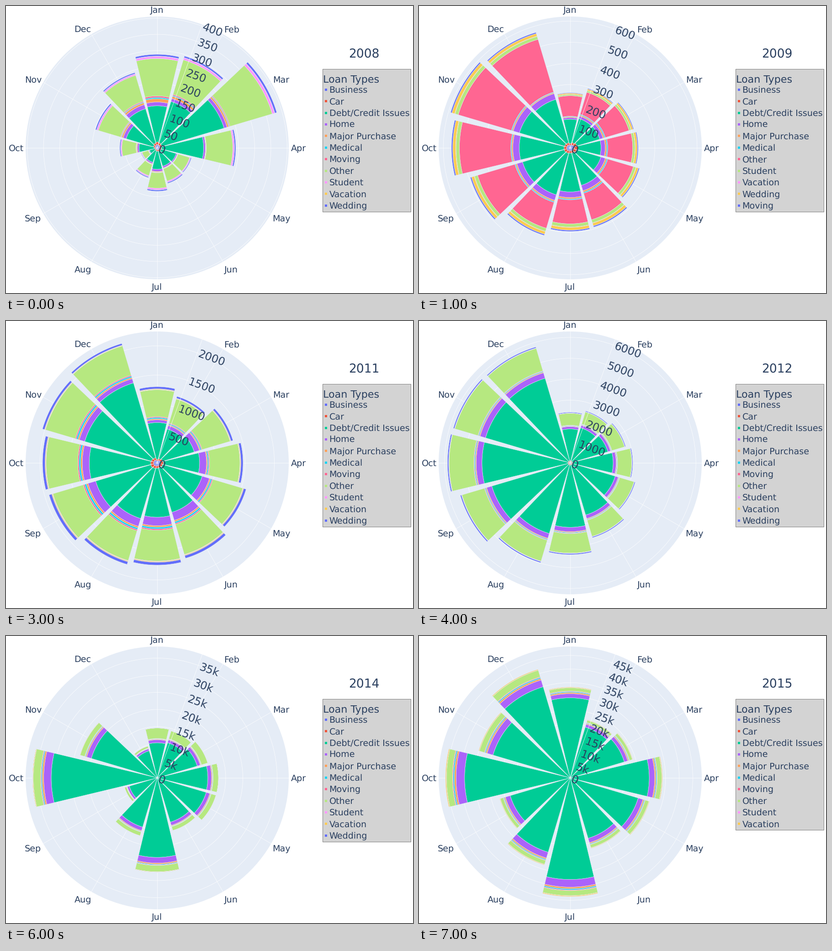
Write a matplotlib script that moves like this. It is 891x629 px and loops after 8 s.

```python
import numpy as np
import matplotlib.pyplot as plt
from matplotlib.animation import FuncAnimation
from matplotlib.collections import PolyCollection
from matplotlib.patches import Circle, Rectangle

W, H, DPI = 891, 629, 64
PT = 72 / DPI  # points per pixel
CX, CY, R = 331, 311, 288
TILT = 20  # direction of the radial axis
INK, PAPER = "#2a3f5f", "#e5ecf6"
COLORS = ["#636efa", "#ef553b", "#00cc96", "#ab63fa", "#ffa15a", "#19d3f3",
          "#ff6692", "#b6e880", "#ff97ff", "#fecb52", "#636efa"]
MONTHS = "Jan Feb Mar Apr May Jun Jul Aug Sep Oct Nov Dec".split()
LABEL_X = [0, 163, 271, 309, 272, 162]
LABEL_Y = [15, 58, 168.5, 318, 472.5, 584, 622.5]
HEAD = ["Business", "Car", "Debt/Credit Issues", "Home", "Major Purchase", "Medical"]
TYPES = HEAD + ["Moving", "Other", "Student", "Vacation", "Wedding"]
TYPES_2009 = HEAD + ["Other", "Student", "Vacation", "Wedding", "Moving"]

plt.rcParams.update({"font.family": "DejaVu Sans", "text.hinting": "no_hinting"})


def curve(*keys):
    """Monthly values through key points spread evenly from Jan to Dec."""
    return np.interp(np.arange(12), np.linspace(0, 11, len(keys)), keys)


def split(lo, hi, mix):
    """Outer edges of the layers that share the ring lo..hi."""
    return [lo + (hi - lo) * f for f in np.cumsum(mix) / sum(mix)]


def rings(total, car, debt, home, small, tail, small_mix, tail_mix):
    """Edge radii of all layers by month, from the share of each group."""
    total = np.array(total)
    debt_end = total * debt
    home_end = debt_end + total * home
    small_end = home_end + total * small
    other_end = total * (1 - tail)
    return [0 * total, 0.55 * car, car, debt_end, home_end,
            *split(home_end, small_end, small_mix),
            other_end, *split(other_end, total, tail_mix)]


# year: (axis maximum, tick step, layer names, edges)
YEARS = {
    2008: (405, 50, TYPES, rings(
        [205, 210, 273, 172, 78, 81, 95, 68, 37, 82, 141, 172],
        car=curve(13, 10, 8, 5, 11), debt=curve(.45, .6, .5, .47, .52),
        home=curve(.04, .02, .05, .04, .055), small=curve(.065, .01, .03, .035, .045),
        tail=curve(.045, .035, .07, .065, .035),
        small_mix=[.55, .2, .25], tail_mix=[.52, .06, .42])),
    2009: (622, 100, TYPES_2009, rings(
        [121, 136, 145, 149, 158, 181, 183, 200, 228, 260, 273, 264],
        car=curve(10, 17, 11, 14, 12), debt=curve(.52, .46, .44, .56, .43, .42),
        home=curve(.03, .06, .07, .055, .05), small=curve(.025, .04, .03, .02, .013),
        tail=curve(.055, .08, .095, .07, .06),
        small_mix=[.6, .4], tail_mix=[.43, .03, .38, .16])),
    2010: (1310, 200, TYPES, rings(
        [128, 138, 168, 192, 205, 230, 252, 248, 247, 252, 254, 273],
        car=curve(7, 7, 11, 12), debt=curve(.41, .45, .41, .44, .47, .465),
        home=curve(.045, .053, .058), small=curve(.03, .025, .045, .04, .042),
        tail=curve(.045, .058, .05, .043, .043),
        small_mix=[.35, .3, .35], tail_mix=[.2, .14, .66])),
    2011: (2245, 500, TYPES, rings(
        [167, 152, 173, 188, 203, 218, 224, 232, 247, 251, 262, 273],
        car=curve(8, 14, 11, 15, 12), debt=curve(.53, .485, .51, .54, .585, .67),
        home=curve(.035, .08, .085, .07, .035), small=curve(.042, .034, .045, .043, .03),
        tail=curve(.04, .036, .04, .035, .02),
        small_mix=[.35, .38, .27], tail_mix=[.1, .2, .7])),
    2012: (6281, 1000, TYPES, rings(
        curve(111, 128, 153, 219, 269, 265),
        car=curve(5), debt=curve(.67, .73), home=.047, small=curve(.027, .017),
        tail=curve(.02, .012),
        small_mix=[.4, .35, .25], tail_mix=[.1, .2, .7])),
    2013: (14670, 2000, TYPES, rings(
        [127, 140, 153, 174, 188, 199, 218, 232, 239, 259, 270, 273],
        car=curve(2.5), debt=curve(.735, .685, .675, .69, .72),
        home=curve(.04, .055, .053, .047, .042), small=.018,
        tail=curve(.012, .013, .008),
        small_mix=[.45, .35, .2], tail_mix=[.1, .25, .65])),
    2014: (38400, 5000, TYPES, rings(
        [110, 108, 116, 135, 135, 121, 207, 133, 75, 273, 177, 73],
        car=curve(2), debt=curve(.7, .82, .84, .85, .85), home=.06, small=.025,
        tail=.006,
        small_mix=[.5, .3, .2], tail_mix=[.05, .9, .05])),
    2015: (48300, 5000, TYPES[:-1], rings(
        [199, 133, 143, 202, 181, 161, 260, 199, 161, 273, 209, 248],
        car=curve(2), debt=curve(.882, .857, .858, .85, .84),
        home=curve(.045, .058, .063, .07, .062), small=.029, tail=.0075,
        small_mix=[.48, .32, .2], tail_mix=[.1, .9])),
}

fig = plt.figure(figsize=(W / DPI, H / DPI), dpi=DPI, facecolor="white")
ax = fig.add_axes([0, 0, 1, 1])


def polar(r, deg):
    """Screen point at radius r, clockwise from the top."""
    a = np.radians(deg)
    return CX + r * np.sin(a), CY - r * np.cos(a)


def text(x, y, s, px, **kw):
    kw = {"ha": "left", "va": "baseline", "color": INK, **kw}
    ax.text(x, y, s, fontsize=px * PT, **kw)


def spoke(deg, zorder):
    ax.plot(*zip((CX, CY), polar(R, deg)), color="white", lw=0.7 * PT, zorder=zorder)


def sector(r0, r1, mid_deg):
    arc = mid_deg + np.linspace(-13.5, 13.5, 28)
    outer = np.column_stack(polar(r1, arc))
    inner = np.column_stack(polar(r0, arc[::-1]))
    return np.vstack([outer, inner])


def draw_grid(top, step):
    ax.add_patch(Circle((CX, CY), R, fc=PAPER, ec="none"))
    for v in range(step, top, step):
        ax.add_patch(Circle((CX, CY), v / top * R, fc="none", ec="white",
                            lw=0.7 * PT, zorder=1.5))
    for m, name in enumerate(MONTHS):
        spoke(30 * m, 1.5)
        side = 1 if m < 6 else -1
        x = LABEL_X[min(m, 12 - m)] if m != 6 else 0
        text(CX + side * x, LABEL_Y[min(m, 12 - m)], name, 19.1, ha="center")


def draw_bars(edges):
    for lo, hi, color in zip(edges, edges[1:], COLORS):
        polys = [sector(lo[m], hi[m], 30 * m) for m in range(12)]
        ax.add_collection(PolyCollection(polys, facecolors=color, edgecolors=PAPER,
                                         linewidths=0.6 * PT, zorder=2))


def draw_axis(top, step):
    c, s = np.cos(np.radians(TILT)), np.sin(np.radians(TILT))
    spoke(TILT, 3)
    for v in range(0, top, step):
        x, y = polar(v / top * R, TILT)
        label = f"{v // 1000}k" if top > 10000 and v else str(v)
        text(x + 3.2 * c - 8.7 * s, y + 3.2 * s + 8.7 * c, label, 24,
             rotation=-TILT, rotation_mode="anchor", zorder=4)


def draw_legend(names):
    ax.add_patch(Rectangle((693, 138.3), 193.2, 33 + 25.4 * len(names),
                           fc="#d3d3d3", ec="#808080", lw=PT))
    text(694, 167.5, "Loan Types", 22.2)
    for i, name in enumerate(names):
        y = 183.3 + 25.4 * i
        ax.add_patch(Rectangle((698, y - 2.5), 5, 5, fc=COLORS[i], ec="none"))
        text(707.5, y + 6.7, name, 19.1)


def draw(frame):
    year = 2008 + frame
    top, step, names, edges = YEARS[year]
    ax.clear()
    ax.set_xlim(0, W)
    ax.set_ylim(H, 0)
    ax.axis("off")
    draw_grid(top, step)
    draw_bars(edges)
    draw_axis(top, step)
    draw_legend(names)
    text(784, 112.7, str(year), 26.5, ha="center")


anim = FuncAnimation(fig, draw, frames=len(YEARS), interval=1000, repeat=True)
plt.show()
```
